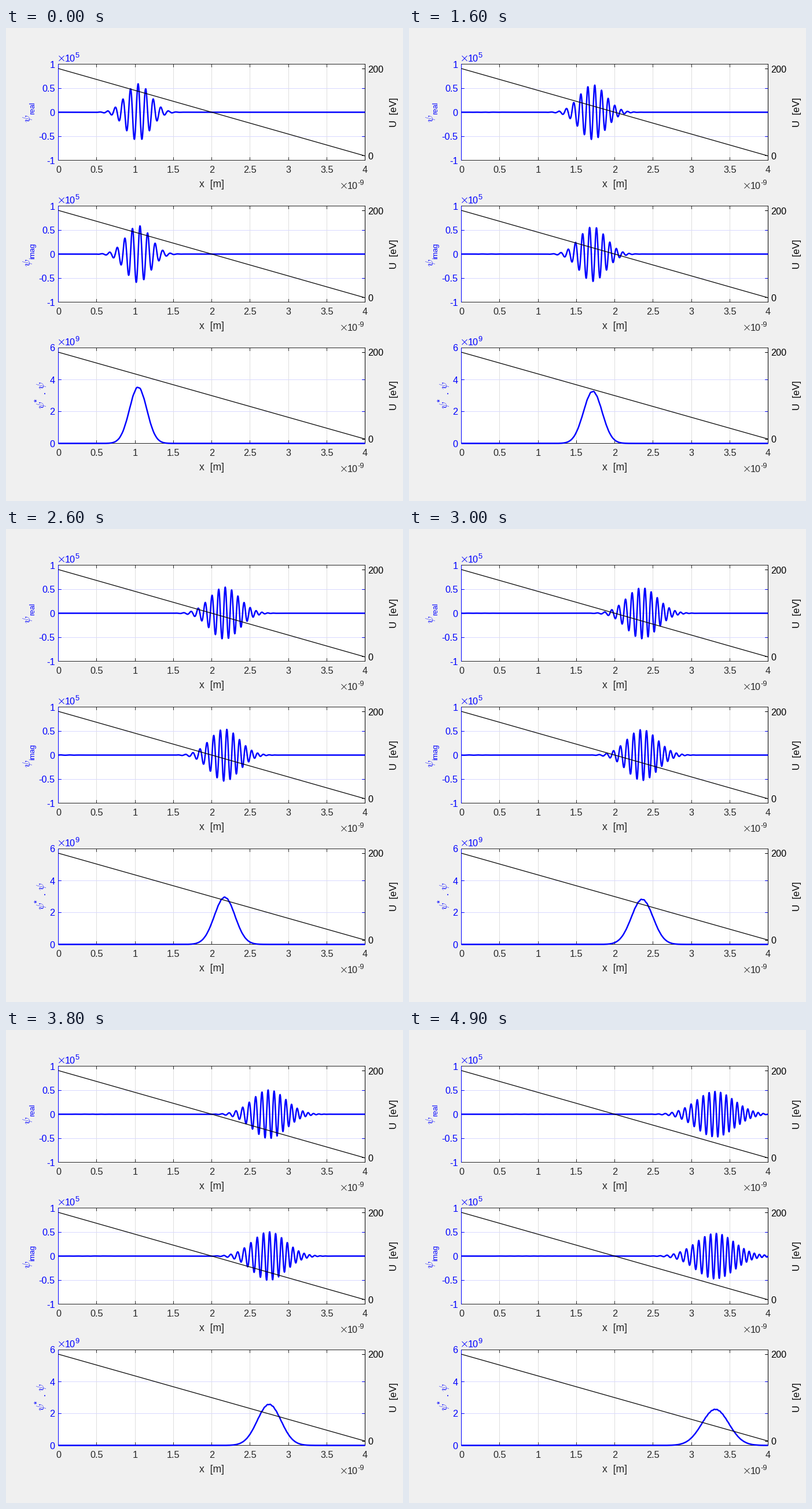
These frames come from a looping animation (686 by 817 pixels, 5000 ms). A matplotlib script:

```python
import math

import numpy as np
import matplotlib.pyplot as plt
from matplotlib.animation import FuncAnimation

W, H, DPI = 686, 817, 64
PT = 72 / DPI  # points per pixel
LEFT, RIGHT = 90.5, 620.5
FRAMES, STEPS = 50, 200
BLUE, DARK, BLACK = "#0000ff", "#262626", "#000000"
GRID_X, GRID_Y = "#dedede", "#d9d9ff"
TICK = 5.3

# Electron in a linear potential, in nm, fs and eV
HBAR, HBAR2_2M = 0.6582120, 0.0380998
LENGTH, NX = 4.0, 1001
START, SIGMA, WAVELENGTH = 1.0, LENGTH / 25, LENGTH / 40
C1 = 0.1


def simulate():
    """Finite-difference evolution; one (real, imag, density) triple per frame."""
    x = np.linspace(0, LENGTH, NX)
    dx = x[1]
    dt = C1 * HBAR * dx**2 / HBAR2_2M
    kick = (200 * (1 - x / LENGTH) * dt / HBAR)[1:-1]
    psi = np.exp(-0.5 * ((x - START) / SIGMA) ** 2
                 + 2j * np.pi * (x - START) / WAVELENGTH)
    psi /= np.sqrt(np.sum(np.abs(psi) ** 2) * dx)
    re, im = psi.real.copy(), psi.imag.copy()

    def hamiltonian(f):
        return (kick + 2 * C1) * f[1:-1] - C1 * (f[2:] + f[:-2])

    states = []
    for _ in range(FRAMES):
        for _ in range(STEPS):
            re[1:-1] += hamiltonian(im)
            im[1:-1] -= hamiltonian(re)
        scale = np.sqrt(0.1)  # nm^-1/2 to 1e5 m^-1/2
        states.append((re * scale, im * scale, re**2 + im**2))
    return x, states


fig = plt.figure(figsize=(W / DPI, H / DPI), dpi=DPI, facecolor="#f0f0f0")
ax = fig.add_axes([0, 0, 1, 1])
ax.set_xlim(0, W)
ax.set_ylim(H, 0)
ax.axis("off")


def line(xs, ys, color, width=1.0, z=2):
    return ax.plot(xs, ys, color=color, lw=width * PT, zorder=z, snap=False,
                   solid_capstyle="butt", solid_joinstyle="round")[0]


def hline(y, x0, x1, color, z=2):
    y = math.floor(y) + 0.5
    line([x0, x1], [y, y], color, z=z)


def vline(x, y0, y1, color, z=2):
    x = math.floor(x) + 0.5
    line([x, x], [y0, y1], color, z=z)


def text(x, y, s, color=DARK, size=16.2, ha="left", rotation=0):
    ax.text(x, y, s, color=color, fontsize=size * PT, ha=ha, va="baseline",
            family="Liberation Sans", rotation=rotation,
            rotation_mode="anchor", math_fontfamily="cm")


def psi_symbol(x, y):
    text(x, y, r"$\psi$", BLUE, 18, rotation=90)


def to_px(x):
    return LEFT + (RIGHT - LEFT) * x / LENGTH


def power(x, y, exponent, color):
    line([x + 1.5, x + 10.5], [y - 10, y - 1], color, 0.9)
    line([x + 1.5, x + 10.5], [y - 1, y - 10], color, 0.9)
    text(x + 11.5, y, "10", color)
    text(x + 29.5, y - 7, exponent, color, 12.8)


def panel(top, bottom, low, high, ticks, exponent):
    def y_px(v):
        return bottom - (bottom - top) * (v - low) / (high - low)

    ax.fill([LEFT, RIGHT, RIGHT, LEFT], [top, top, bottom, bottom],
            color="white", lw=0, zorder=0, snap=False)
    for i in range(9):
        x = to_px(i / 2)
        if 0 < i < 8:
            vline(x, top, bottom, GRID_X, z=1)
            vline(x, bottom, bottom - TICK, DARK)
            vline(x, top, top + TICK, DARK)
        text(x, bottom + 21.7, f"{i / 2:g}", ha="center")
    for v in ticks:
        y = y_px(v)
        if low < v < high:
            hline(y, LEFT, RIGHT, GRID_Y, z=1)
        hline(y, LEFT, LEFT + TICK, BLUE)
        hline(y, RIGHT, RIGHT - TICK, BLUE)
        text(84.5, y + 6, f"{v:g}", BLUE, ha="right")
    for y in (top, bottom):
        hline(y, LEFT, RIGHT, DARK)
    vline(LEFT, top - 0.5, bottom + 0.5, BLUE)
    vline(RIGHT, top - 0.5, bottom + 0.5, BLACK, z=3)

    # Potential on the right-hand scale, which spans -10 to 210 eV
    u200, u0 = (bottom - (bottom - top) * (u + 10) / 220 for u in (200, 0))
    line([LEFT, RIGHT], [u200, u0], BLACK, 1.25, z=5)
    for y, label in ((u200, "200"), (u0, "0")):
        hline(y, RIGHT, RIGHT - TICK, BLACK, z=3)
        text(625.5, y + 6.5, label, BLACK)

    text((LEFT + RIGHT) / 2 - 0.5, bottom + 46.5, "x  [m]", size=17.6,
         ha="center")
    text(675, (top + bottom) / 2, "U  [eV]", BLACK, 16.8, "center", 90)
    power(90, top - 4.5, exponent, BLUE)
    power(578, bottom + 49.5, "-9", DARK)
    return line([], [], BLUE, 2.5, z=4), y_px


WAVE_TICKS = (-1, -0.5, 0, 0.5, 1)
panels = [
    panel(62.5, 228.5, -1, 1, WAVE_TICKS, "5"),
    panel(307.5, 473.5, -1, 1, WAVE_TICKS, "5"),
    panel(552.5, 717.5, 0, 6, (0, 2, 4, 6), "9"),
]

for start, subscript in ((162.5, "real"), (412, "imag")):
    psi_symbol(42, start)
    text(49.5, start - 13.5, subscript, BLUE, 12.8, rotation=90)
psi_symbol(66, 657.5)
text(58.5, 645.5, "*", BLUE, 14, rotation=90)
text(67.5, 631.5, ".", BLUE, 17.6, rotation=90)
psi_symbol(66, 624)

grid, states = simulate()
grid_px = to_px(grid)


def update(frame):
    for (curve, y_px), values in zip(panels, states[frame]):
        curve.set_data(grid_px, y_px(values))
    return [curve for curve, _ in panels]


animation = FuncAnimation(fig, update, frames=FRAMES, interval=100,
                          repeat=True, repeat_delay=0)
plt.show()
```
